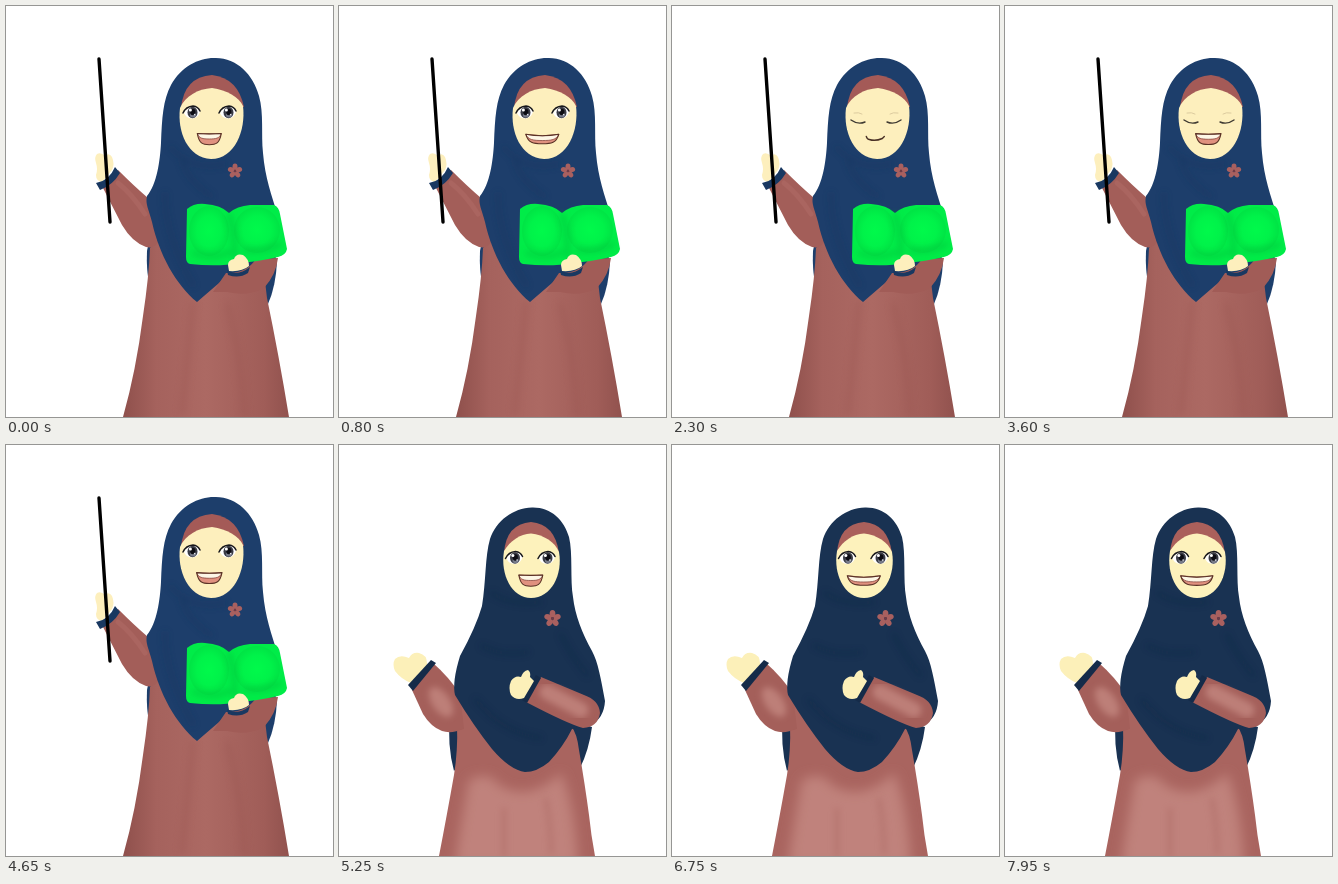
An HTML page for the animation above (8 s loop, 327 px wide and 411 px high).

```html
<!DOCTYPE html>
<html lang="en">
<head>
<meta charset="utf-8">
<title>Teacher talking</title>
<style>
html, body { margin: 0; width: 100%; height: 100%; overflow: hidden; background: #fff; }
svg { display: block; width: 100vw; height: 100vh; }
.line { fill: none; stroke-linecap: round; stroke-linejoin: round; }
</style>
</head>
<body>
<svg viewBox="0 0 327 411">
  <defs>
    <linearGradient id="dress" x1="0" x2="1">
      <stop offset="0" stop-color="#8f504c"/><stop offset=".2" stop-color="#a5625d"/>
      <stop offset=".5" stop-color="#ac6963"/><stop offset=".85" stop-color="#a05d58"/>
      <stop offset="1" stop-color="#91524e"/>
    </linearGradient>
    <radialGradient id="page">
      <stop offset="0" stop-color="#00ff4c"/><stop offset=".6" stop-color="#00f54a"/>
      <stop offset="1" stop-color="#00e043"/>
    </radialGradient>
    <filter id="soft" x="-40%" y="-40%" width="180%" height="180%"><feGaussianBlur stdDeviation="3"/></filter>
    <filter id="softer" x="-40%" y="-40%" width="180%" height="180%"><feGaussianBlur stdDeviation="6"/></filter>
    <g id="flower">
      <g id="petals" fill="#a9605f"></g>
      <circle r="1.2" fill="#713c47"/>
    </g>
    <g id="eye">
      <path d="M-8 1Q-5-5 1-5.5Q7-5 8 0Q6 6 0 6.5Q-6 6-8 1Z" fill="#fff"/>
      <ellipse cx=".5" cy=".5" rx="5" ry="5.8" fill="#3a3c46"/>
      <ellipse cx="1" cy="3.2" rx="3" ry="2.4" fill="#777b8a"/>
      <ellipse cx=".8" cy="0" rx="2.6" ry="3.2" fill="#0c0c13"/>
      <circle cx="-1.6" cy="-2" r="1.5" fill="#fff"/>
      <circle cx="2.6" cy="2.6" r=".8" fill="#dfe2ea"/>
      <path d="M-9 1Q-6-5.5 1-6Q6-5.5 8-1" class="line" stroke="#17171c" stroke-width="1.5"/>
    </g>
    <g id="lid" class="line">
      <path d="M-7-1Q0 4 7 1" stroke="#3f3a32" stroke-width="1.4"/>
      <path d="M-4-8Q1-9 4-7" stroke="#dccb9f" stroke-width="1"/>
    </g>
  </defs>

  <g id="pose1">
    <path d="M145 225L141 245Q140 265 144 282L262 298Q270 280 271 255L250 200Z" fill="#1d3e6b"/>
    <path d="M147 238L180 225L256 250L261 292Q273 350 283 411H117Q130 365 137 310Q143 270 144 242Z" fill="url(#dress)"/>
    <path d="M187 298Q182 350 176 405M222 300Q235 350 238 408" class="line" stroke="#97534f" stroke-width="7" opacity=".25" filter="url(#soft)"/>
    <path d="M96 180L112 164Q128 180 142 192L152 236Q148 243 140 241Q126 236 116 219Z" fill="#a35e59"/>
    <path d="M112 177Q126 188 139 208" class="line" stroke="#b36f69" stroke-width="5" opacity=".4"/>
    <path d="M208 52C230 51 247 68 253 90C258 108 255 128 257 147C259 172 266 190 271 207L266 262L220 271L191 296C170 279 153 248 146 216C143 204 139 198 141 190C151 178 154 155 155 137C156 112 157 94 165 79C175 61 192 52 208 52Z" fill="#1d3e6b"/>
    <path d="M165 142Q187 166 219 158M176 155Q182 175 205 190M159 188Q158 227 187 279" class="line" stroke="#16335b" stroke-width="4" opacity=".4" filter="url(#soft)"/>
    <path d="M175 102Q178 71 206 69Q232 72 238 101Z" fill="#a45a57"/>
    <path d="M206 82C221 84 233 91 237 100C240 124 229 153 205 153C182 152 171 126 174 102C179 90 192 83 206 82Z" fill="#fdefbd"/>
    <use href="#flower" x="229" y="165"/>
    <path d="M91 148Q95 146 99 150Q103 146 106 151Q109 158 106 164L96 176Q90 175 90 169Q92 163 90 157Q88 151 91 148Z" fill="#fdefbd"/>
    <path d="M90 177Q103 175 109 161L114 167Q107 179 94 184Z" fill="#193861"/>
    <path d="M93 53L104 216" class="line" stroke="#000" stroke-width="3.4"/>
    <path d="M220 267Q240 268 250 253L272 252Q270 269 258 282Q242 291 221 286L207 286Z" fill="#a15c57"/>
    <path d="M181 203Q188 197 199 198Q215 199 223 207Q231 200 244 199L268 199Q273 201 274 208L281 243Q280 249 272 251Q250 256 233 257Q213 261 184 258Q180 257 180 251Z" fill="#00ec48"/>
    <ellipse cx="203" cy="225" rx="20" ry="25" fill="url(#page)" opacity=".7"/>
    <ellipse cx="251" cy="224" rx="23" ry="23" fill="url(#page)" opacity=".7"/>
    <path d="M223 209Q229 225 229 251M188 247Q206 254 224 246M239 244Q261 246 274 238" class="line" stroke="#00b837" stroke-width="4" opacity=".55" filter="url(#soft)"/>
    <path d="M221 264Q231 271 244 261L242 267Q233 273 222 269Z" fill="#193861"/>
    <path d="M222 259Q222 254 228 253Q230 247 237 249Q243 253 243 260Q236 266 223 265Z" fill="#fdefbd"/>
    <g class="face"></g>
  </g>

  <g id="pose2">
    <path d="M111 270Q108 300 115 326L128 310V275ZM231 275L253 282Q250 305 241 323Z" fill="#193252"/>
    <path d="M116 250L232 281Q238 288 240 305Q246 340 250 370Q252 390 256 411H100Q107 375 115 330Q119 305 118 280Z" fill="#a9645f"/>
    <path d="M130 335Q150 325 160 340Q190 358 222 328Q236 360 239 420H116Q123 370 130 335Z" fill="#c0827b" filter="url(#softer)"/>
    <path d="M165 365V410M207 355Q212 380 212 407" class="line" stroke="#a5625d" stroke-width="5" opacity=".35" filter="url(#soft)"/>
    <path d="M73 245L95 219Q109 231 121 249L125 284Q112 289 103 286Q92 282 84 269Z" fill="#a45f5a"/>
    <ellipse cx="102" cy="257" rx="9" ry="17" transform="rotate(-35 102 257)" fill="#bd7f78" filter="url(#soft)"/>
    <path d="M193 62.500C212 62 225 75 230 92C234 108 231 135 234 152C236 170 243 188 253 206C259 217 262 234 266 256Q265 273 252 280L233 284Q224 302 210 317Q198 327 186 327Q171 325 153 304Q134 280 116 250Q113 237 121 211Q137 182 143 161C147 137 146 111 151 94C157 76 174 63 193 62.500Z" fill="#193252"/>
    <path d="M153 148Q170 161 201 157M143 201Q164 212 188 207M137 255Q163 287 201 293M222 190Q231 209 248 230" class="line" stroke="#10233f" stroke-width="4" opacity=".35" filter="url(#soft)"/>
    <path d="M165 108Q167 79 192 77Q216 79 220 108Z" fill="#aa605b"/>
    <path d="M192 88.500C205 90 216 97 220 107C224 130 212 153 192 153C173 153 161 130 165 106C171 96 181 89 192 88.500Z" fill="#fdf2bc"/>
    <use href="#flower" transform="translate(213.5 173.5) scale(1.15)"/>
    <path d="M56 214Q61 209 70 213Q73 207 80 208Q88 210 88 218L89 221L72 238Q62 234 56 226Q53 219 56 214Z" fill="#fcf0b9"/>
    <path d="M69 240L92 215L97 218L74 246Z" fill="#152b49"/>
    <path d="M202 232L245 250Q260 255 261 268Q259 282 244 283Q229 279 187 257Z" fill="#a45f5a"/>
    <path d="M208 247L242 265" class="line" stroke="#bd7f78" stroke-width="15" filter="url(#soft)"/>
    <path d="M197 230L202 233L188 258L183 255Z" fill="#152b49"/>
    <path d="M172 236Q176 230 182 232Q184 226 189 225Q192 227 191 232L195 236L185 253Q177 256 172 250Q169 243 172 236Z" fill="#fcf0b9"/>
    <g class="face"></g>
  </g>
</svg>
<script>
const LOOP = 8000, CUT = 5250, STEP = 50, BLINK = 1300;

// Mouth shapes: half width, lip sag, depth, tongue share, drop.
const OPEN = [12, .8, 11.2, 1, 0];
const WIDE = [16.5, 3, 9.5, .2, .8];
const SHUT = [9, 4, 4, 0, 4];
const mix = (a, b, k) => a.map((v, i) => v + (b[i] - v) * k);
const TALK = [OPEN, mix(OPEN, WIDE, .15), WIDE, SHUT, mix(WIDE, OPEN, .08),
  mix(OPEN, WIDE, .45), mix(OPEN, WIDE, .08)];

const petals = document.getElementById('petals');
petals.innerHTML = [0, 72, 144, 216, 288]
  .map(a => `<ellipse cy="-4.2" rx="2.5" ry="3.2" transform="rotate(${a})"/>`).join('');

function mouth(x, y, [w, sag, d, tongue, drop]) {
  const top = `M${-w} 0Q0 ${sag} ${w} 0`;
  let art;
  if (d <= sag) {
    art = `<path d="M${-w} -1Q${-w + 1} 2 ${-w + 3} 2Q0 ${sag} ${w - 2} 1L${w} -1"
      class="line" stroke="#493026" stroke-width="1.4"/>`;
  } else {
    const curve = e => `C${w * .85} ${e * .9} ${w * .55} ${e} 0 ${e}S${-w * .85} ${e * .9} ${-w} 0Z`;
    const teeth = sag / 2 + (d - sag / 2) * (.62 - .15 * tongue);
    art = `<path d="${top}${curve(d)}" fill="#e0917f"/>
      <path d="${top}${curve(teeth)}" fill="#fdf6e6" stroke="#8a4a40" stroke-width=".8"/>
      <path d="${top}${curve(d)}" class="line" stroke="#5a3226" stroke-width="1.1"/>`;
  }
  return `<g transform="translate(${x} ${y + drop})">${art}</g>`;
}

function eyes(xs, y, shut) {
  return xs.map((x, i) => {
    const flip = i ? 'scale(-1 1)' : '';
    return shut
      ? `<use href="#lid" transform="translate(${x} ${y + 9}) ${flip}"/>`
      : `<use href="#eye" transform="translate(${x} ${y})"/>`;
  }).join('');
}

const poses = [
  { id: 'pose1', eyes: [186, 222], eyeY: 106, mouth: [203.3, 127.5] },
  { id: 'pose2', eyes: [175.5, 208], eyeY: 112.5, mouth: [191.8, 130] }
].map(p => {
  const node = document.getElementById(p.id);
  return { ...p, node, face: node.querySelector('.face') };
});

let last = '';
function draw(t) {
  const scene = t < CUT ? 0 : 1;
  const local = Math.min(scene ? t - CUT : t, 5100);
  let step = Math.floor(local / STEP);
  const phase = step * STEP % BLINK;
  const shut = phase >= 950 && phase < 1150;
  if (step > 30) step--; // one beat is held
  const beat = step % TALK.length;
  const key = [scene, beat, shut].join();
  if (key === last) return;
  last = key;
  poses.forEach((p, i) => { p.node.style.display = i === scene ? '' : 'none'; });
  const p = poses[scene];
  p.face.innerHTML = eyes(p.eyes, p.eyeY, shut) + mouth(...p.mouth, TALK[beat]);
}

const start = performance.now();
function tick() {
  draw((performance.now() - start) % LOOP);
  requestAnimationFrame(tick);
}
tick();
</script>
</body>
</html>
```
